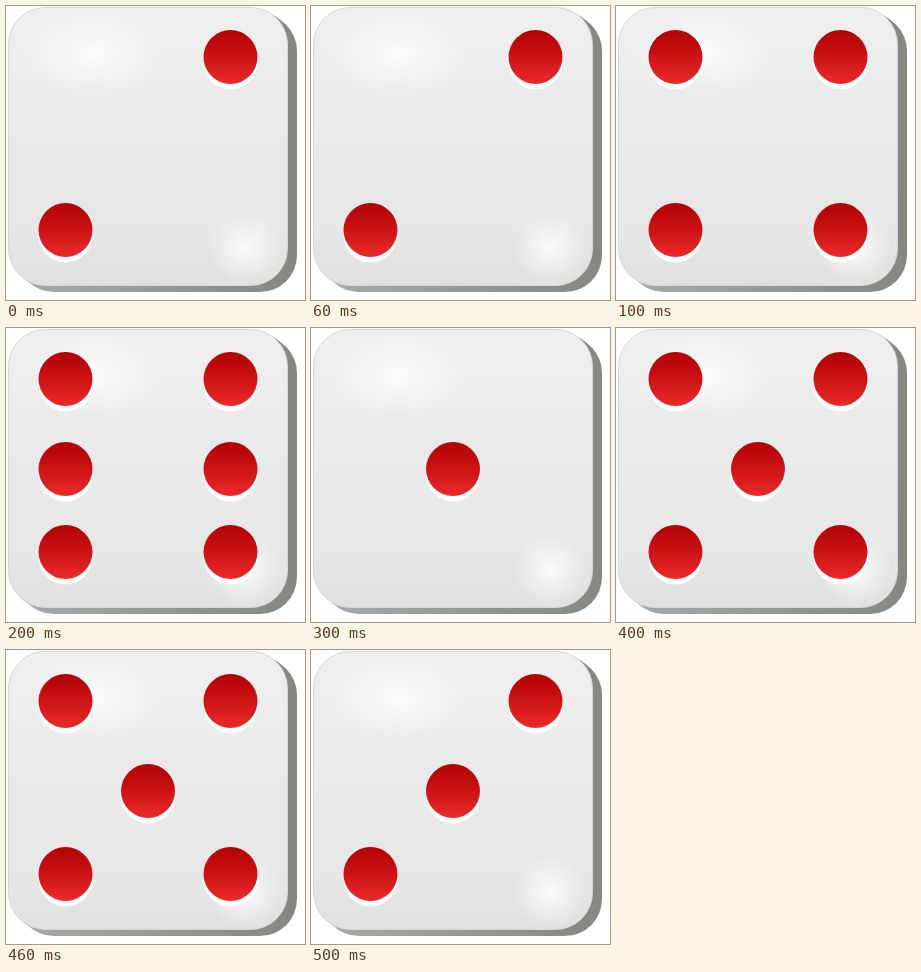
An HTML page that plays this animation: 299 by 294 pixels, repeating every 0.6 s.

```html
<!DOCTYPE html>
<html lang="en">
<head>
<meta charset="utf-8">
<title>Rolling die</title>
<style>
html, body { margin: 0; width: 100%; height: 100%; overflow: hidden; background: #fff; }
svg { display: block; }
</style>
</head>
<body>
<svg width="299" height="294" viewBox="0 0 299 294">
  <defs>
    <linearGradient id="face" x2="0" y2="1">
      <stop offset="0" stop-color="#efefef"/>
      <stop offset=".4" stop-color="#eaeaea"/>
      <stop offset=".8" stop-color="#e7e7e7"/>
      <stop offset="1" stop-color="#e0e0e0"/>
    </linearGradient>
    <linearGradient id="side" x2="1" y2="0">
      <stop offset="0" stop-color="#a9a9a7"/>
      <stop offset="1" stop-color="#868682"/>
    </linearGradient>
    <linearGradient id="red" x2="0" y2="1">
      <stop offset="0" stop-color="#b20306"/>
      <stop offset=".35" stop-color="#c30d0f"/>
      <stop offset="1" stop-color="#ea2a2a"/>
    </linearGradient>
    <radialGradient id="glow">
      <stop offset="0" stop-color="#fff" stop-opacity=".85"/>
      <stop offset=".5" stop-color="#fff" stop-opacity=".4"/>
      <stop offset="1" stop-color="#fff" stop-opacity="0"/>
    </radialGradient>
    <g id="pip">
      <circle cy="5.5" r="27" fill="#fff"/>
      <circle r="27" fill="url(#red)"/>
    </g>
  </defs>
  <g fill="url(#side)">
    <rect x="6.5" y="4.5" width="280" height="278" rx="37"/>
    <rect x="11" y="8" width="280" height="278" rx="37"/>
  </g>
  <rect x="2.5" y="1.5" width="279" height="278" rx="37" fill="url(#face)" stroke="#d6d6d6"/>
  <ellipse cx="87" cy="48" rx="66" ry="40" fill="url(#glow)"/>
  <circle cx="239" cy="242" r="37" fill="url(#glow)"/>
  <g id="pips"></g>
</svg>
<script>
const left = 59.5, mid = 142, right = 224.5;
const top_ = 51, center = 141, bottom = 224;
const spots = [
  [left, top_], [right, top_],
  [left, center], [mid, center], [right, center],
  [left, bottom], [right, bottom]
];
// Spot indices shown on each successive face
const faces = ["15", "0156", "012456", "3", "01356", "135"];

const group = document.getElementById("pips");
group.innerHTML = spots.map(([x, y]) =>
  `<use href="#pip" transform="translate(${x} ${y})"/>`).join("");
const pips = [...group.children];

const start = performance.now();
function draw() {
  const step = Math.floor((performance.now() - start) / 100) % faces.length;
  pips.forEach((pip, i) => {
    pip.style.display = faces[step].includes(i) ? "" : "none";
  });
  requestAnimationFrame(draw);
}
draw();
</script>
</body>
</html>
```
